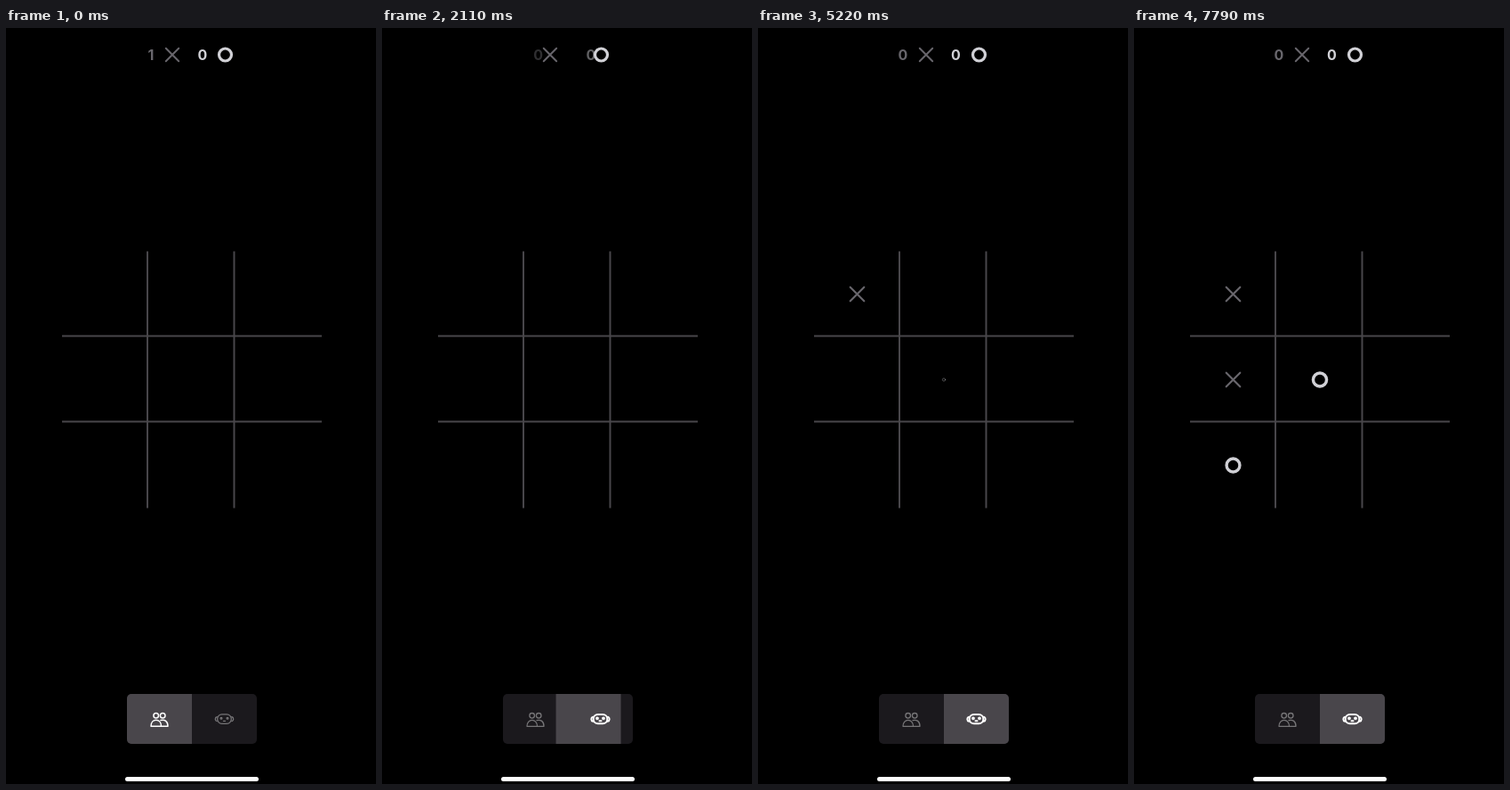
An HTML page that plays this animation: 416 by 848 pixels, repeating every 8000 ms.

```html
<!DOCTYPE html>
<html lang="en">
<head>
<meta charset="utf-8">
<title>Tic-tac-toe</title>
<style>
  html, body { margin: 0; width: 100%; height: 100%; overflow: hidden; background: #000; }
  svg { display: block; width: 100%; height: 100%; }
  text { font: 700 16px Inter, "Liberation Sans", sans-serif; text-anchor: middle; }
  .line { fill: none; stroke-linecap: round; stroke-linejoin: round; }
  .cross { stroke: #68666c; stroke-width: 2; }
  .ring { stroke: #d1d1d6; stroke-width: 3.2; }
  .icon { stroke: #fff; stroke-width: 1.4; }
</style>
</head>
<body>
<svg viewBox="0 0 416 848">
  <defs>
    <path id="cross" class="line cross" d="M-7.2-7.2 7.2 7.2M7.2-7.2-7.2 7.2"/>
    <circle id="ring" class="line ring" r="7"/>
    <clipPath id="pill"><rect x="136" y="747" width="146" height="56" rx="5"/></clipPath>
  </defs>
  <rect width="416" height="848"/>

  <text id="scoreX" y="36" fill="#68666c">1</text>
  <text id="scoreO" y="36" fill="#d1d1d6">0</text>
  <use id="markX" href="#cross"/>
  <use id="markO" href="#ring"/>

  <path d="M159 250.5V538.5M256.5 250.5V538.5M63 345.5H355M63 441.5H355" stroke="#48464a" stroke-width="2"/>
  <g id="moves"></g>

  <g clip-path="url(#pill)">
    <rect x="136" y="747" width="146" height="56" fill="#1b191d"/>
    <rect id="thumb" y="747" width="73" height="56" fill="#49464b"/>
  </g>
  <g id="people" class="line icon">
    <circle cx="168.7" cy="771.3" r="2.8"/>
    <circle cx="176.2" cy="771.3" r="2.8"/>
    <path d="M163 783.3C163 774 174.5 774 174.5 783.3ZM174.5 783.3H182C182 777.5 178.5 775.5 174 776.6"/>
  </g>
  <g id="robot" class="line icon">
    <rect x="237.7" y="769.9" width="15.6" height="10.4" rx="5"/>
    <path d="M237.2 772.7Q235.3 773.2 235.3 775.2T237.2 777.7M253.8 772.7Q255.7 773.2 255.7 775.2T253.8 777.7M244.5 777.3H246.5"/>
    <circle cx="242" cy="774.3" r="0.9"/>
    <circle cx="249" cy="774.3" r="0.9"/>
  </g>
  <rect x="134" y="840" width="150" height="5" rx="2.5" fill="#fff"/>
</svg>
<script>
  const LOOP = 8000;
  const byId = id => document.getElementById(id);
  const clamp = v => Math.min(1, Math.max(0, v));
  const mix = (a, b, p) => a + (b - a) * p;

  // Critically damped spring from 0 to 1; rate is in radians per second.
  function spring(t, start, rate) {
    const x = Math.max(0, t - start) / 1000 * rate;
    return 1 - (1 + x) * Math.exp(-x);
  }

  const moves = [
    { mark: 'cross', x: 111.5, y: 298.5, start: 4280 },
    { mark: 'ring', x: 209, y: 394.5, start: 5130 },
    { mark: 'cross', x: 111.5, y: 394.5, start: 6310 },
    { mark: 'ring', x: 111.5, y: 490.5, start: 7160 }
  ];
  for (const move of moves) {
    move.node = document.createElementNS('http://www.w3.org/2000/svg', 'use');
    move.node.setAttribute('href', '#' + move.mark);
    byId('moves').append(move.node);
  }

  function place(node, x, y, scale = 1) {
    node.setAttribute('transform', `translate(${x} ${y}) scale(${scale})`);
  }

  function setScore(node, value, x, hidden) {
    node.textContent = value;
    node.setAttribute('x', x + 16 * hidden);
    node.setAttribute('opacity', Math.sqrt(1 - hidden));
  }

  function setIcon(node, active, activeWidth) {
    node.style.opacity = mix(0.4, 1, active);
    node.style.strokeWidth = mix(1.3, activeWidth, active);
  }

  function draw(t) {
    const reset = t > 1850;
    const hidden = clamp(spring(t, 1370, 14.8) - spring(t, 1977, 6.4));
    setScore(byId('scoreX'), reset ? 0 : 1, 163, hidden);
    setScore(byId('scoreO'), 0, reset ? 222.3 : 221, hidden);
    place(byId('markX'), mix(187, 189, spring(t, 1690, 14)), 30);
    place(byId('markO'), mix(246.5, 248.5, spring(t, 2100, 8)), 30);

    const slide = spring(t, 1626, 6.4);
    byId('thumb').setAttribute('x', mix(136, 209, slide));
    const swap = clamp((slide - 0.1) / 0.65);
    setIcon(byId('people'), 1 - swap, 1.5);
    setIcon(byId('robot'), swap, 2);

    for (const { node, x, y, start } of moves) {
      const grow = spring(t, start, 9.5);
      place(node, x, y, grow * 1.08);
      node.setAttribute('opacity', Math.sqrt(grow));
    }
  }

  function tick() {
    draw(performance.now() % LOOP);
    requestAnimationFrame(tick);
  }
  tick();
</script>
</body>
</html>
```
